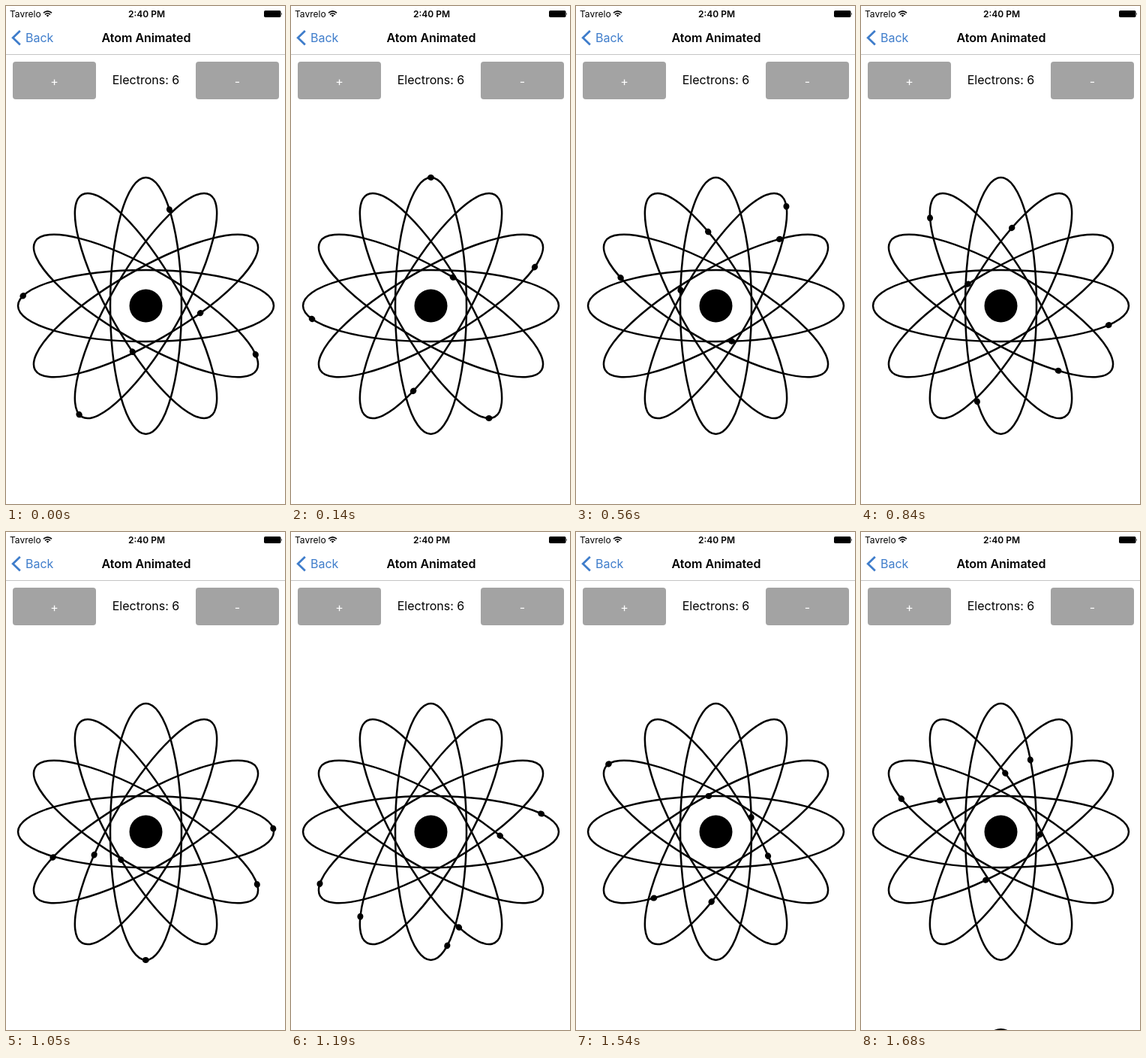
Animation of 372 by 662 pixels, one loop 1750 ms. Source, as an HTML page:

```html
<!DOCTYPE html>
<html lang="en">
<head>
<meta charset="utf-8">
<title>Atom Animated</title>
<style>
  html, body { margin: 0; width: 100%; height: 100%; overflow: hidden; background: #fff; }
  svg { display: block; width: 372px; height: 662px; font: 16px Inter, sans-serif; }
  .status { font-size: 12px; }
  .bold { font-weight: 600; }
  .mid { text-anchor: middle; }
  .line { fill: none; stroke: #000; stroke-width: 2.5; }
</style>
</head>
<body>
<svg viewBox="0 0 372 662">
  <!-- status bar -->
  <text class="status" x="5" y="14.5">Tavrelo</text>
  <g fill="none" stroke="#000" stroke-width="1.6">
    <path d="M50 9.2Q55.5 4.4 61 9.2M52 11.3Q55.5 8.2 59 11.3"/>
    <path d="M53.6 12.6Q55.5 11 57.4 12.6L55.5 14.6Z" fill="#000" stroke="none"/>
  </g>
  <text class="status bold mid" x="187.5" y="14.5">2:40 PM</text>
  <rect x="344" y="6" width="22.5" height="9" rx="1.8"/>
  <path d="M367.2 8.8q1.6 1.7 0 3.4z"/>

  <!-- navigation bar -->
  <path d="M18.8 33L9.2 42.3L18.8 51.6" fill="none" stroke="#3f7dcb" stroke-width="2.8"/>
  <text x="26" y="48" fill="#3f7dcb">Back</text>
  <text class="bold mid" x="187" y="48">Atom Animated</text>
  <rect y="64" width="372" height="1" fill="#c4c4c4"/>

  <!-- controls -->
  <g fill="#a3a3a3">
    <rect x="9" y="74" width="111" height="50" rx="4"/>
    <rect x="253" y="74" width="111" height="50" rx="4"/>
  </g>
  <g class="mid">
    <text x="64.5" y="105.5" fill="#fff">+</text>
    <text x="308.5" y="105.5" fill="#fff">-</text>
    <text x="186.5" y="104">Electrons: 6</text>
  </g>

  <g id="atom" transform="translate(186.5 398.5)">
    <circle r="22"/>
  </g>
  <circle id="next" cx="186.5" cy="682" r="22" visibility="hidden"/>
</svg>
<script>
  const A = 170.5, B = 47.5;
  const STEP = 70, STEPS = 25;
  const RAD = Math.PI / 180;

  // tilt of the orbit, start angle and degrees per tick
  const orbits = [
    [0, 196.1, 12.58],
    [30, -21.1, 22.22],
    [60, 75, 21.89],
    [90, 221.4, 13.82],
    [-60, 185.7, 18.54],
    [-30, 70.1, 12.93]
  ];

  const atom = document.getElementById('atom');
  const next = document.getElementById('next');

  function add(parent, tag, attrs) {
    const el = document.createElementNS('http://www.w3.org/2000/svg', tag);
    for (const key in attrs) el.setAttribute(key, attrs[key]);
    return parent.appendChild(el);
  }

  const electrons = orbits.map(([tilt, start, speed]) => {
    const g = add(atom, 'g', { transform: `rotate(${tilt})` });
    add(g, 'ellipse', { class: 'line', rx: A, ry: B });
    return { start, speed, dot: add(g, 'ellipse', { rx: 4.5, ry: 4 }) };
  });

  function draw(step) {
    // the motion skips one tick after the first step
    const tick = step > 1 ? step + 1 : step;
    for (const { start, speed, dot } of electrons) {
      const t = (start - speed * tick) * RAD;
      const x = A * Math.cos(t), y = B * Math.sin(t);
      const turn = Math.atan2(B * Math.cos(t), -A * Math.sin(t)) / RAD;
      dot.setAttribute('transform', `translate(${x} ${y}) rotate(${turn})`);
    }
    next.setAttribute('visibility', step === STEPS - 1 ? 'visible' : 'hidden');
  }

  const begin = performance.now();
  function frame() {
    const time = Math.max(0, performance.now() - begin);
    draw(Math.floor(time / STEP) % STEPS);
    requestAnimationFrame(frame);
  }
  frame();
</script>
</body>
</html>
```
